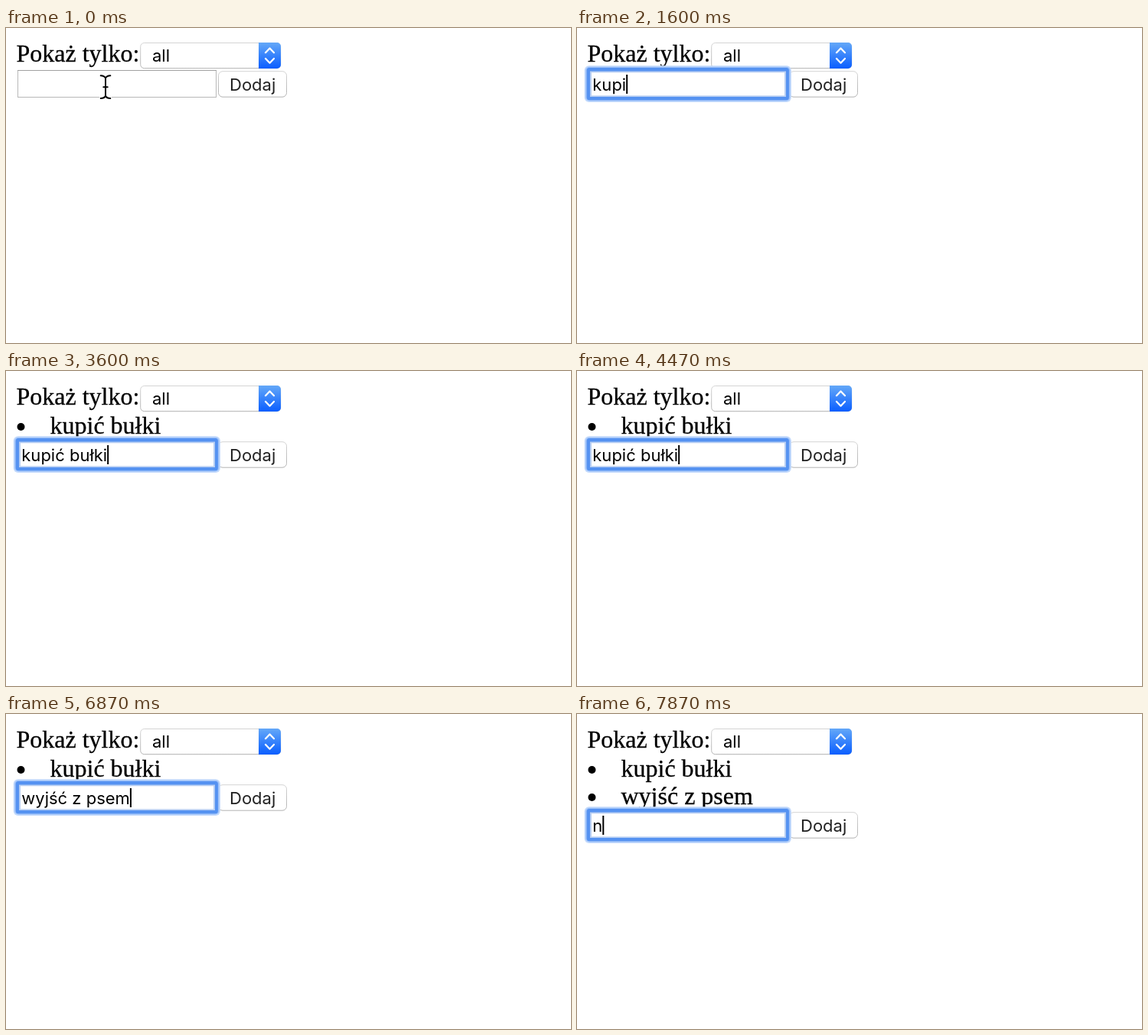
An HTML page for the animation above (8 s loop, 738 px wide and 412 px high).

```html
<!DOCTYPE html>
<html lang="pl">
<head>
<meta charset="utf-8">
<title>Lista zadań</title>
<style>
  html, body { margin: 0; width: 100%; height: 100%; overflow: hidden; background: #fff; }
  svg { display: block; width: 738px; height: 412px; }
  text { white-space: pre; fill: #000; }
  .serif { font: 32px "Liberation Serif", serif; stroke: #000; stroke-width: .3px; }
  .ui { font: 22px Inter, sans-serif; }
</style>
</head>
<body>
<svg viewBox="0 0 738 412">
  <defs>
    <linearGradient id="blue" x2="0" y2="1">
      <stop offset="0" stop-color="#64a8f8"/>
      <stop offset="1" stop-color="#0a5eff"/>
    </linearGradient>
    <linearGradient id="edge" x2="0" y2="1">
      <stop offset="0" stop-color="#d4d4d4"/>
      <stop offset="1" stop-color="#b2b2b2"/>
    </linearGradient>
    <path id="ibeam" d="M123.7 62.2q4.6 0 6.3 3.3q1.7-3.3 6.3-3.3M130 65V89M123.7 92q4.6 0 6.3-3.3q1.7 3.3 6.3 3.3M127.3 77.3h5.4"/>
  </defs>
  <rect width="738" height="412" fill="#fff"/>

  <text class="serif" x="13.5" y="44">Pokaż tylko:</text>
  <rect x="175.7" y="19.5" width="183" height="33.2" rx="5" fill="#fff" stroke="url(#edge)"/>
  <path d="M330 19h24a5 5 0 0 1 5 5v24a5 5 0 0 1-5 5h-24z" fill="url(#blue)"/>
  <path d="M339 32.2l5.5-5.7 5.5 5.7M339 40l5.5 5.7 5.5-5.7" fill="none" stroke="#fff"
    stroke-width="2.3" stroke-linecap="round" stroke-linejoin="round"/>
  <text class="ui" x="191" y="44">all</text>

  <g class="item"><circle cx="19.5" cy="73" r="5"/><text class="serif" x="57.5" y="82">kupić bułki</text></g>
  <g class="item"><circle cx="19.5" cy="109" r="5"/><text class="serif" x="57.5" y="118">wyjść z psem</text></g>

  <g id="form">
    <rect x="277.5" y="56.7" width="89" height="33.5" rx="5.5" fill="#fff" stroke="url(#edge)"/>
    <text class="ui" x="292" y="82" style="fill:#222">Dodaj</text>
    <g id="plain">
      <rect x="15.5" y="55.5" width="259" height="35" fill="#fff" stroke="#b8b8b8"/>
      <path d="M15 55.5h260" stroke="#a0a0a0"/>
    </g>
    <g id="ring">
      <rect x="9.7" y="49.2" width="270.2" height="47.8" rx="6" fill="#c3daFC"/>
      <rect x="11.2" y="50.7" width="267.2" height="44.8" rx="5" fill="#9cc0f8"/>
      <rect x="12.7" y="52" width="264.2" height="42.2" rx="3.5" fill="#5592f1"/>
      <rect x="17" y="56.5" width="256" height="33.5" fill="#b8cff3"/>
      <rect x="19" y="58.3" width="252" height="30" fill="#fff"/>
    </g>
    <text class="ui" id="typed" x="20.3" y="82"></text>
    <rect id="caret" y="61" width="2" height="25"/>
  </g>

  <g id="pointer" fill="none" stroke-linecap="round">
    <use href="#ibeam" stroke="#fff" stroke-width="4.5"/>
    <use href="#ibeam" stroke="#000" stroke-width="2"/>
  </g>
</svg>
<script>
const LOOP = 8000, FOCUS = 130, BLINK = 500, ROW = 36;
const adds = [3530, 7200];
// Each entry: text to type, then the moment of every key
const lines = [
  ["kupić bułki", [1000, 1200, 1330, 1530, 1800, 2000, 2270, 2530, 2930, 3070, 3200]],
  ["wyjść z psem", [4930, 5070, 5270, 5530, 5930, 6000, 6070, 6130, 6200, 6270, 6530, 6670]],
  ["n", [7730]]
];
const clears = [0, 4530, 7530];

const $ = id => document.getElementById(id);
const show = (el, on) => el.setAttribute("visibility", on ? "visible" : "hidden");
const items = document.querySelectorAll(".item");
const typed = $("typed"), caret = $("caret");

function draw(t) {
  const rows = adds.filter(a => t >= a).length;
  const focused = t >= FOCUS;
  const line = clears.filter(c => t >= c).length - 1;
  const [text, keys] = lines[line];
  const count = keys.filter(k => t >= k).length;
  const lastEdit = count ? keys[count - 1] : Math.max(clears[line], FOCUS);

  items.forEach((el, i) => show(el, i < rows));
  $("form").setAttribute("transform", `translate(0 ${rows * ROW})`);
  show($("plain"), !focused);
  show($("ring"), focused);
  show($("pointer"), t < lines[0][1][0]);

  const value = text.slice(0, count);
  if (typed.textContent !== value) typed.textContent = value;
  const width = value ? typed.getComputedTextLength() : 0;
  caret.setAttribute("x", 20.3 + width);
  show(caret, focused && Math.floor((t - lastEdit) / BLINK) % 2 === 0);
}

const start = performance.now();
function tick() {
  draw((performance.now() - start) % LOOP);
  requestAnimationFrame(tick);
}
tick();
</script>
</body>
</html>
```
